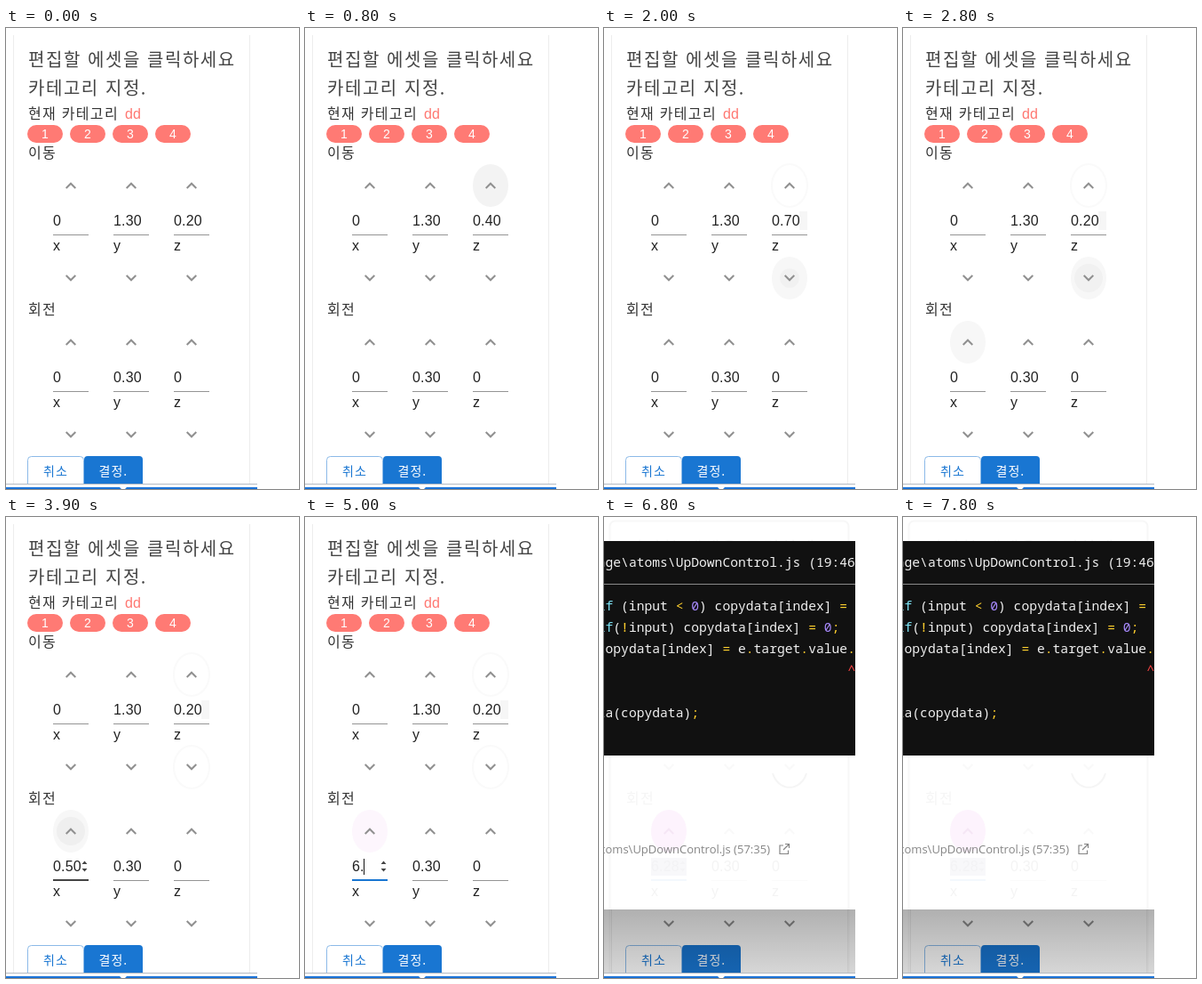
An HTML page that plays this animation: 330x518 px, repeating every 8 s.

```html
<!DOCTYPE html>
<html lang="ko">
<head>
<meta charset="utf-8">
<style>
html, body { margin: 0; height: 100%; overflow: hidden; background: #fff; }
svg { display: block; }
text { white-space: pre; fill: #222; font: 16px "Liberation Sans", "Noto Sans CJK KR", sans-serif; letter-spacing: .15px; }
.ko { font-family: "Noto Sans CJK KR", sans-serif; letter-spacing: 1.3px; fill: #333; }
.title { font-size: 20px; font-weight: 300; letter-spacing: 1.55px; fill: #444; }
.button { font-size: 14px; letter-spacing: 1px; }
.chip { font-size: 14px; fill: #fff; text-anchor: middle; }
.code text { font: 500 14.66px "Noto Sans Mono", monospace; letter-spacing: 0; fill: #f0f0f0; }
.code .mark { fill: #ffd02e; }
.code .word { fill: #7fe3f5; }
.code .number { fill: #a98bff; }
.link { font: 13px "Open Sans", sans-serif; letter-spacing: 0; fill: #858585; text-anchor: end; }
</style>
</head>
<body>
<svg id="stage" width="330" height="518" viewBox="0 0 330 518"></svg>
<script>
const LOOP = 8000;
const ERROR_AT = 6800;
const columns = [53, 121, 189];

const label = (x, y, text, cls = '', extra = '') =>
  `<text x="${x}" y="${y}" class="${cls}" ${extra}>${text}</text>`;
const rect = (x, y, w, h, fill, extra = '') =>
  `<rect x="${x}" y="${y}" width="${w}" height="${h}" fill="${fill}" ${extra}/>`;
const pill = (id, cx, cy) => `<g id="${id}">
  <ellipse cx="${cx}" cy="${cy}" rx="20" ry="24"/><circle cx="${cx}" cy="${cy}"/></g>`;
const chevron = (cx, cy, dir, color = '#909090') =>
  `<path d="M-5.3 3-0-2.3 5.3 3" transform="translate(${cx} ${cy}) scale(1 ${dir})" fill="none" stroke="${color}" stroke-width="2"/>`;

function control(name, top, values) {
  return columns.map((x, i) =>
    chevron(x + 20, top + 24, 1) +
    label(x, top + 69, values[i], '', `id="${name}${i}"`) +
    rect(x, top + 79, 40, 1, '#949494') +
    label(x, top + 97, 'xyz'[i]) +
    chevron(x + 20, top + 128, -1)).join('');
}

// Keywords, numbers and punctuation are highlighted, brackets are not.
function codeLine(y, text) {
  const colored = text.replace(/\bif\b|\d|[<=!;.]/g, token => {
    const kind = token === 'if' ? 'word' : /\d/.test(token) ? 'number' : 'mark';
    return `<tspan class="${kind}">${token === '<' ? '&lt;' : token}</tspan>`;
  });
  return label(-7.3, y, colored);
}

const panel = `
  <path d="M8.5 8V512M274.5 8V512" stroke="#ededed"/>
  ${label(25, 43, '편집할 에셋을 클릭하세요', 'ko title')}
  ${label(25, 75, '카테고리 지정.', 'ko title')}
  ${label(25, 102, '현재 카테고리', 'ko')}
  ${label(134, 102, 'dd', '', 'style="fill:#ff7872"')}
  ${[1, 2, 3, 4].map(n => rect(n * 48 - 24, 109, 40, 20, '#ff7a74', 'rx="10"') +
    label(n * 48 - 4, 124, n, 'chip')).join('')}
  ${label(25, 146, '이동', 'ko')}
  ${label(25, 322, '회전', 'ko')}
  ${pill('moveUp', 209, 177)}${pill('moveDown', 209, 281)}${pill('turnUp', 73, 353)}
  ${rect(220, 206, 9, 21, '#f6f6f6', 'id="spinGhost"')}
  ${control('move', 153, ['0', '1.30', '0.20'])}
  ${control('turn', 329, ['0', '0.30', '0'])}
  ${rect(53, 407, 40, 2, '#444', 'id="underline"')}
  <path id="spinner" d="M85.5 390l3-3.5 3 3.5zM85.5 395l3 3.5 3-3.5z" fill="#444"/>
  ${rect(0, 384, 1, 18, '#111', 'id="caret"')}
  ${rect(24.5, 481.5, 63, 40, '#fff', 'rx="4" stroke="#8cbae8"')}
  ${rect(88, 481, 66, 40, '#1976d2', 'rx="4"')}
  ${label(42, 503, '취소', 'ko button', 'style="fill:#1976d2"')}
  ${label(104.5, 503, '결정.', 'ko button', 'style="fill:#fff"')}`;

const overlay = `
  ${rect(0, 0, 283, 441, '#fff', 'opacity=".95"')}
  ${rect(6.5, 4.5, 269, 520, 'none', 'rx="6" stroke="#f7f7f7" stroke-width="2"')}
  <ellipse cx="73" cy="353" rx="20" ry="24" fill="#fdf3fd"/>
  ${chevron(73, 353, 1, '#f5e6f5')}
  <path d="M190 288a20 23 0 0 0 38 0" fill="none" stroke="#f5f5f5" stroke-width="2"/>
  ${rect(53, 383, 40, 20, '#f4f4f7', 'opacity=".6"')}
  ${rect(0, 441, 283, 71, 'url(#shade)')}
  ${rect(0, 27, 283, 241, '#111')}
  ${rect(0, 75, 283, 1, '#8a8a8a')}
  <g class="code">
    ${label(-7.3, 56, 'age\\atoms\\UpDownControl.js (19:46')}
    ${codeLine(105, 'if (input < 0) copydata[index] =')}
    ${codeLine(129, 'if(!input) copydata[index] = 0;')}
    ${codeLine(153, 'copydata[index] = e.target.value.')}
    ${label(274.5, 177, '^', '', 'style="fill:#f44"')}
    ${codeLine(225, 'ta(copydata);')}
  </g>
  ${label(187, 378, 'atoms\\UpDownControl.js (57:35)', 'link')}
  <path d="M202 369h-4v9.500h9.500v-4M204 367.500h4.500v4.500M208.500 367.500l-6.500 6.500" fill="none" stroke="#858585" stroke-width="1.200"/>`;

const stage = document.getElementById('stage');
stage.innerHTML = `
  <defs>
    <linearGradient id="shade" x2="0" y2="1">
      <stop stop-opacity=".31"/><stop offset="1" stop-opacity=".16"/>
    </linearGradient>
    <clipPath id="view"><rect width="283" height="512"/></clipPath>
  </defs>
  <g clip-path="url(#view)">${panel}<g id="overlay">${overlay}</g></g>
  ${rect(0, 512, 283, 1, '#b4bac2')}
  ${rect(0, 516, 283, 2, '#1a73d8')}
  <path d="M128 516h8l-2 2h-4z" fill="#fff"/>`;

const el = id => document.getElementById(id);
const show = (id, on) => el(id).setAttribute('visibility', on ? 'inherit' : 'hidden');
const within = (t, from, to) => t >= from && t < to;
const passed = (t, times) => times.filter(time => t >= time).length;

const ups = [600, 800, 1000, 1100, 1200, 1400];
const downs = [1900, 2200, 2400, 2500, 2700, 2800];
const turns = [3100, 3300, 3500, 3600, 3800];
const keys = [4500, 5000, 5100, 5200];

function setPill(id, t, { enter, press, leave, fill = '#f7f7f7', wave = '#f1f1f1', release = leave }) {
  const [body, ripple] = el(id).children;
  const hovered = t < leave;
  show(id, t >= enter);
  body.setAttribute('fill', hovered ? fill : '#fff');
  body.setAttribute('stroke', hovered ? 'none' : '#fafafa');
  body.setAttribute('stroke-width', 2);
  ripple.setAttribute('fill', wave);
  ripple.setAttribute('r', within(t, press, release) ? Math.min(16, 9 + (t - press) / 55) : 0);
}

function render(t) {
  el('move2').textContent = ((2 + passed(t, ups) - passed(t, downs)) / 10).toFixed(2);

  const clicks = passed(t, turns);
  const typed = passed(t, keys);
  el('turn0').textContent = typed ? '6.28'.slice(0, typed) : clicks ? (clicks / 10).toFixed(2) : '0';

  setPill('moveUp', t, { enter: 600, press: 1000, leave: 1500, fill: '#f3f3f3', wave: '#e8e8e8' });
  setPill('moveDown', t, { enter: 1600, press: 1900, leave: 3100 });
  setPill('turnUp', t, { enter: 2800, press: 3100, release: 4000, leave: LOOP, fill: t < 4200 ? '#f7f7f7' : '#fdf6fd', wave: '#efefef' });

  const focused = t >= 4200;
  show('spinGhost', t >= 1600);
  show('underline', t >= 3800);
  el('underline').setAttribute('fill', focused ? '#1976d2' : '#444');
  show('spinner', t >= 3800);
  show('caret', within(t, 4200, 5200) || within(t, 5900, ERROR_AT));
  el('caret').setAttribute('x', Math.floor(53 + el('turn0').getComputedTextLength() - .5));
  show('overlay', t >= ERROR_AT);
}

function tick() {
  render(performance.now() % LOOP);
  requestAnimationFrame(tick);
}
tick();
</script>
</body>
</html>
```
